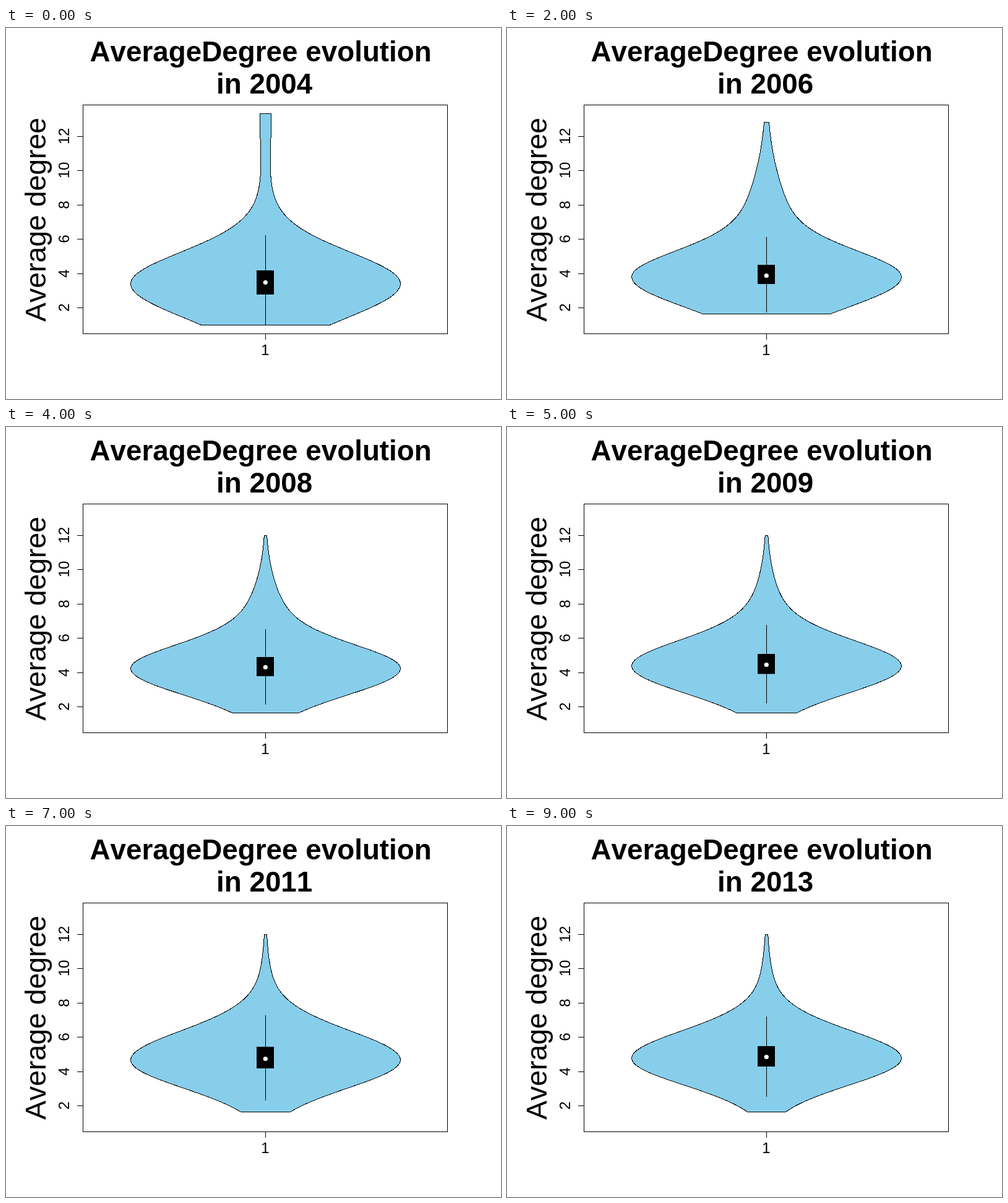
Animation, 800 px wide and 600 px high, one loop 10000 ms. Source, as an HTML page:

```html
<!DOCTYPE html>
<html lang="en">
<head>
<meta charset="utf-8">
<title>Average degree violin plot</title>
<style>
  html, body { margin: 0; width: 100%; height: 100%; overflow: hidden; background: #fff; }
  svg { display: block; width: 800px; height: 600px; }
  text { font-family: "Liberation Sans", Arial, sans-serif; font-size: 24px; font-kerning: none; }
  .title { font-size: 45.8px; font-weight: bold; }
  .label { font-size: 46.4px; }
  .middle { text-anchor: middle; }
  path { fill: none; stroke: #000; shape-rendering: crispEdges; }
  #violin { fill: #87ceeb; }
</style>
</head>
<body>
<svg viewBox="0 0 800 600">
  <text class="title" x="135.5" y="54">AverageDegree evolution</text>
  <text class="title" x="340" y="106" id="year"></text>
  <text class="label" transform="translate(64 475) rotate(-90)">Average degree</text>
  <path d="M124.5 124.5H713.5V494.5H124.5Z M419.5 494.5V504"/>
  <text class="middle" x="419" y="529">1</text>
  <g id="axis"></g>
  <path id="violin"/>
  <path id="whisker"/>
  <rect id="box" x="405" width="28"/>
  <circle id="median" cx="419.3" r="3.6" fill="#fff"/>
</svg>
<script>
const CENTER = 419.5, HALF_WIDTH = 218, FIRST_YEAR = 2004, YEARS = 10;
const byId = id => document.getElementById(id);

// Key years; the years between them are interpolated.
// below, above: spread of the body on either side of its peak
// tail, reach: size and spread of the long upper tail
// outlier: width added around the top
const keys = [
  { year: 2004, top: 138, bottom: 480, peak: 413, q3: 392, q1: 431, below: 55, above: 49, tail: 40, reach: 85, outlier: 9 },
  { year: 2005, top: 138, bottom: 480, peak: 411, q3: 391, q1: 426, below: 51, above: 48, tail: 45, reach: 95, outlier: 8 },
  { year: 2006, top: 152, bottom: 462, peak: 402, q3: 383, q1: 414, below: 49, above: 40, tail: 61, reach: 107, outlier: 0 },
  { year: 2008, top: 175, bottom: 462, peak: 390, q3: 372, q1: 403, below: 43, above: 36, tail: 63, reach: 83, outlier: 0 },
  { year: 2011, top: 175, bottom: 462, peak: 378, q3: 357, q1: 392, below: 45.6, above: 46, tail: 30, reach: 88, outlier: 0 },
  { year: 2013, top: 175, bottom: 462, peak: 375, q3: 356, q1: 389, below: 44, above: 43, tail: 30, reach: 88, outlier: 0 }
];

function shapeFor(year) {
  const next = keys.findIndex(key => key.year >= year);
  const b = keys[next], a = keys[Math.max(next - 1, 0)];
  const t = a === b ? 1 : (year - a.year) / (b.year - a.year);
  return Object.fromEntries(Object.keys(b).map(name => [name, a[name] + (b[name] - a[name]) * t]));
}

const bell = (distance, spread) => Math.exp(-(distance ** 2) / (2 * spread ** 2));

function halfWidth(y, s) {
  const d = y - s.peak;
  if (d > 0) return HALF_WIDTH * bell(d, s.below);
  return (HALF_WIDTH - s.tail) * bell(d, s.above)
       + s.tail * bell(d, s.reach)
       + s.outlier * bell(y - s.top, 70);
}

function outline(s) {
  const steps = 90, left = [], right = [];
  for (let i = 0; i <= steps; i++) {
    const y = s.bottom + (s.top - s.bottom) * i / steps;
    const w = halfWidth(y, s);
    left.push(`${CENTER - w} ${y + 0.5}`);
    right.unshift(`${CENTER + w} ${y + 0.5}`);
  }
  return `M${[...left, ...right].join("L")}Z`;
}

function show(year) {
  const s = shapeFor(year);
  const boxHeight = s.q1 - s.q3;
  const whisker = 1.5 * boxHeight - 1;
  byId("year").textContent = `in ${year}`;
  byId("violin").setAttribute("d", outline(s));
  byId("whisker").setAttribute("d",
    `M${CENTER} ${s.q3 - whisker}V${Math.min(s.q1 + whisker, s.bottom)}`);
  byId("box").setAttribute("y", s.q3);
  byId("box").setAttribute("height", boxHeight);
  byId("median").setAttribute("cy", s.peak - 1.5);
}

for (let value = 2; value <= 12; value += 2) {
  const y = Math.round(452 - (value - 2) * 27.7);
  byId("axis").innerHTML += `<path d="M115 ${y + 0.5}H124"/>
    <text class="middle" transform="translate(102 ${y}) rotate(-90)">${value}</text>`;
}

const start = performance.now();
let shown;
function tick() {
  const year = FIRST_YEAR + Math.floor((performance.now() - start) / 1000) % YEARS;
  if (year !== shown) show(shown = year);
  requestAnimationFrame(tick);
}
tick();
</script>
</body>
</html>
```
